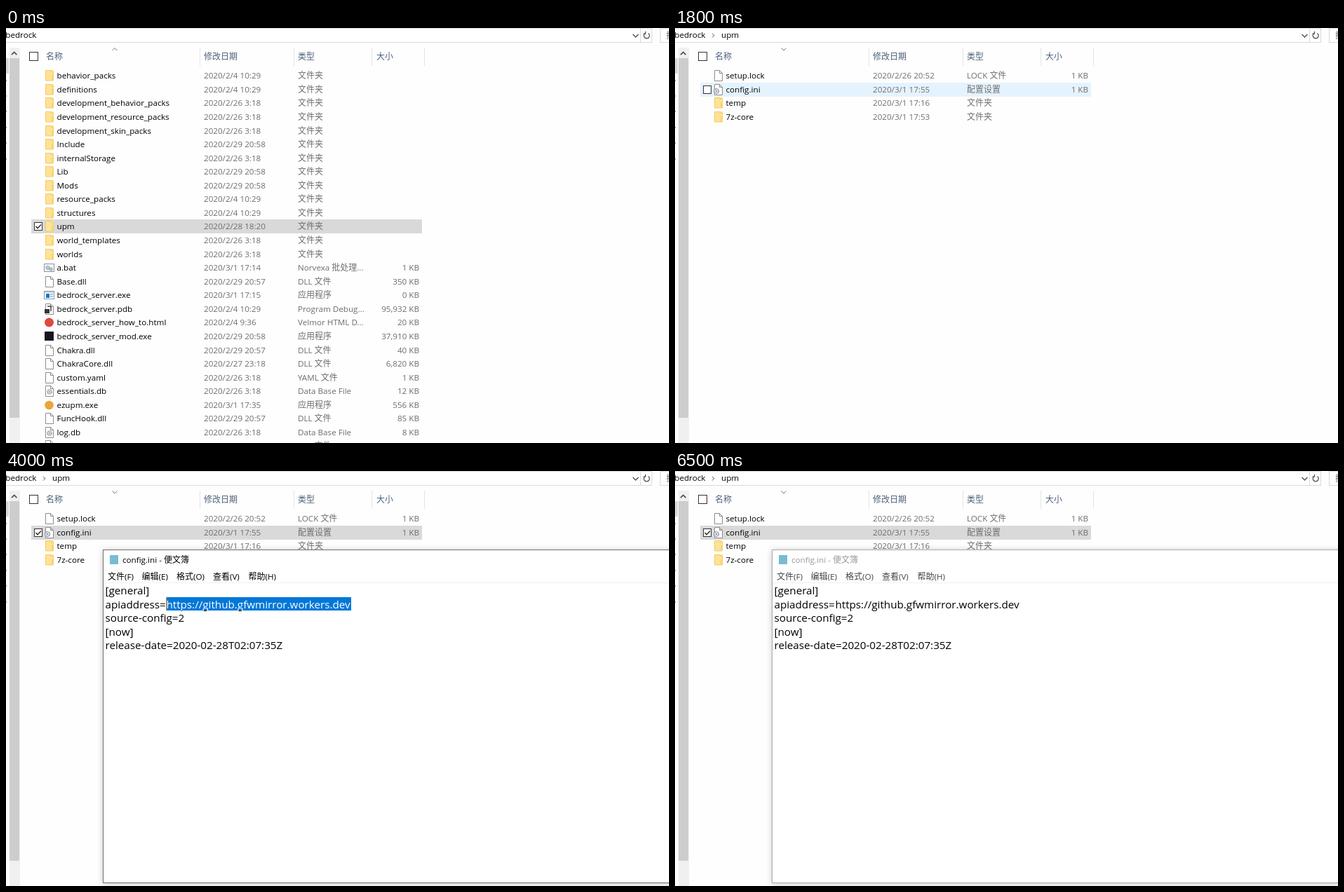
An HTML page for the animation above (6600 ms loop, 945 by 592 pixels).

```html
<!DOCTYPE html>
<html lang="zh">
<head>
<meta charset="utf-8">
<title>config.ini</title>
<style>
  html, body { margin: 0; width: 100%; height: 100%; overflow: hidden; background: #fefefe; }
  svg { display: block; }
  text { font-family: "Open Sans", "Noto Sans CJK SC", "Noto Sans CJK", sans-serif; white-space: pre; }
  .cjk { font-family: "Noto Sans CJK SC", "Noto Sans CJK", sans-serif; }
</style>
</head>
<body>
<svg id="stage" width="945" height="592" viewBox="0 0 945 592"></svg>
<script>
const LOOP = 6600, STEP = 100;
const GREY = '#6d6d6d', HEAD = '#4c607a';
const stage = document.getElementById('stage');

function el(parent, tag, attrs = {}) {
  const node = document.createElementNS('http://www.w3.org/2000/svg', tag);
  for (const k in attrs) node.setAttribute(k, attrs[k]);
  parent.appendChild(node);
  return node;
}
const group = (p, attrs) => el(p, 'g', attrs);
const rect = (p, x, y, width, height, fill, more) => el(p, 'rect', { x, y, width, height, fill, ...more });
const box = (p, x, y, w, h, fill, stroke) => rect(p, x + .5, y + .5, w - 1, h - 1, fill, { stroke });
const path = (p, d, stroke, width = 1, fill = 'none') => el(p, 'path', { d, stroke, 'stroke-width': width, fill });
const show = (node, on) => node.setAttribute('visibility', on ? 'visible' : 'hidden');

// Chinese runs are set slightly larger than Latin ones.
function label(p, x, y, str, fill = '#000', size = 11.65, anchor = 'start') {
  const node = el(p, 'text', { x, y, fill, 'font-size': size, 'text-anchor': anchor });
  str.split(/([\u3000-\u9fff]+)/).forEach((run, i) => {
    if (!run) return;
    el(node, 'tspan', i % 2 ? { class: 'cjk', 'font-size': size * 1.03 } : {}).textContent = run;
  });
  return node;
}

function gear(p, x, y, r) {
  el(p, 'circle', { cx: x, cy: y, r, fill: '#e8edf0', stroke: '#8b959c', 'stroke-width': 1.5, 'stroke-dasharray': '1.6 .6' });
  el(p, 'circle', { cx: x, cy: y, r: r * .35, fill: '#8b959c' });
}
const page = (p, y) => path(p, `M56.5 ${y - 7.5}h7l4 4v11h-11zM63.5 ${y - 7.5}v4h4`, '#8c8c8c', 1, '#fff');

const icons = {
  folder(p, y) {
    rect(p, 56, y - 8, 12, 15, '#ffe293');
    path(p, `M56.5 ${y - 7.5}h8v2h3v12.5h-11z`, '#f0cb69');
    rect(p, 65, y - 1, 3, 8, '#f7d374');
  },
  page,
  db(p, y) { page(p, y); gear(p, 62, y + 1, 3); },
  ini(p, y) { page(p, y); gear(p, 59, y + 2, 3.4); },
  bat(p, y) {
    box(p, 54, y - 6, 15, 12, '#f4f8fb', '#8a969e');
    gear(p, 59.5, y, 2.4);
    gear(p, 64, y + 2, 1.9);
  },
  exe(p, y) {
    box(p, 54, y - 6, 15, 12, '#fff', '#8a969e');
    rect(p, 55, y - 5, 13, 2, '#c9d6df');
    rect(p, 57, y - 2, 5, 6, '#1778c8');
    rect(p, 63, y - 2, 4, 2, '#9cc4e4');
    rect(p, 63, y + 1, 4, 2, '#9cc4e4');
  },
  pdb(p, y) {
    page(p, y);
    rect(p, 55, y, 7, 6, '#333');
    path(p, `M59 ${y - 4}h5v7`, '#444', 1.5);
  },
  red(p, y) { el(p, 'circle', { cx: 61.5, cy: y, r: 6.5, fill: '#dc4a3d' }); },
  dark(p, y) { rect(p, 55, y - 7, 13, 13, '#1a1320'); },
  gold(p, y) { el(p, 'circle', { cx: 61.5, cy: y, r: 6.3, fill: '#e5a93a' }); }
};

const rowY = i => Math.round(68.3 + 19.56 * i);
const types = { F: '文件夹', D: 'DLL 文件', A: '应用程序', B: 'Data Base File' };

function fileList(rows) {
  const g = group(stage);
  rows.trim().split('\n').forEach((line, i) => {
    const [name, date, type, size, icon] = line.trim().split('|');
    const y = rowY(i);
    icons[icon || (type === 'F' ? 'folder' : 'page')](g, y);
    label(g, 72.5, y + 4, name);
    label(g, 282, y + 4, '2020/' + date, GREY);
    label(g, 416, y + 4, types[type] || type, GREY);
    if (size) label(g, 589, y + 4, size + ' KB', GREY, 11.65, 'end');
  });
  return g;
}

// Address bar, navigation edge and scrollbar
box(stage, -5, 0, 926, 21, '#fff', '#d9d9d9');
path(stage, 'M904.5 1V20', '#d9d9d9');
box(stage, 932, 0, 40, 21, '#fff', '#d9d9d9');
path(stage, 'M893.5 9l4 4 4-4', '#555', 1.5);
path(stage, 'M915.5 7.6a4 4 0 1 1-4.6 0M911.5 4.8v3.4h-3', '#555', 1.3);
label(stage, 941, 15, '搜索', GREY);
label(stage, 43.3, 14, 'bedrock', '#000', 11.65, 'end');
const crumb = group(stage);
path(crumb, 'M53 8l2.8 2.8L53 13.6', '#555');
label(crumb, 66, 14, 'upm');
rect(stage, 0, 43, 4, 22, '#d9d9d9');
for (let i = 0; i < 6; i++) rect(stage, 0, Math.round(73.5 + 22.4 * i), 1, 2, '#999');
rect(stage, 5, 28, 15, 564, '#f0f0f0');
rect(stage, 5, 43, 14, 513, '#cdcdcd');
path(stage, 'M8 38.2l3.7-3.7 3.7 3.7', '#505050', 1.7);

// Column headings
const header = group(stage);
box(header, 33, 34, 13, 13, '#fff', '#333');
[[57, '名称'], [282, '修改日期'], [416, '类型'], [528, '大小']].forEach(([x, s]) => label(header, x, 45, s, HEAD));
[276, 410, 521, 596].forEach(x => rect(header, x, 28, 1, 26, '#e5e5e5'));
const arrowUp = path(header, 'M151.5 32l3.5-3.5 3.5 3.5', '#777');
const arrowDown = path(header, 'M151.5 28.5l3.5 3.5 3.5-3.5', '#777');

function highlight() {
  const g = group(stage);
  const bar = rect(g, 36.5, -9.5, 556, 19, '#fff');
  box(g, 40, -6, 12, 12, '#fff', '#333');
  const tick = path(g, 'M42.5 0l2.5 2.7 5-5.2', '#222', 1.3);
  return (row, fill, stroke, checked) => {
    show(g, row >= 0);
    show(tick, row >= 0 && checked);
    g.setAttribute('transform', `translate(0 ${rowY(Math.max(row, 0))})`);
    bar.setAttribute('fill', fill);
    bar.setAttribute('stroke', stroke);
  };
}
const hoverBar = highlight(), pickBar = highlight();

const server = fileList(`
  behavior_packs|2/4 10:29|F
  definitions|2/4 10:29|F
  development_behavior_packs|2/26 3:18|F
  development_resource_packs|2/26 3:18|F
  development_skin_packs|2/26 3:18|F
  Include|2/29 20:58|F
  internalStorage|2/26 3:18|F
  Lib|2/29 20:58|F
  Mods|2/29 20:58|F
  resource_packs|2/4 10:29|F
  structures|2/4 10:29|F
  upm|2/28 18:20|F
  world_templates|2/26 3:18|F
  worlds|2/26 3:18|F
  a.bat|3/1 17:14|Norvexa 批处理...|1|bat
  Base.dll|2/29 20:57|D|350
  bedrock_server.exe|3/1 17:15|A|0|exe
  bedrock_server.pdb|2/4 10:29|Program Debug...|95,932|pdb
  bedrock_server_how_to.html|2/4 9:36|Velmor HTML D...|20|red
  bedrock_server_mod.exe|2/29 20:58|A|37,910|dark
  Chakra.dll|2/29 20:57|D|40
  ChakraCore.dll|2/27 23:18|D|6,820
  custom.yaml|2/26 3:18|YAML 文件|1
  essentials.db|2/26 3:18|B|12|db
  ezupm.exe|3/1 17:35|A|556|gold
  FuncHook.dll|2/29 20:57|D|85
  log.db|2/26 3:18|B|8|db
  lualib.dll|2/29 20:57|D|52`);
const upm = fileList(`
  setup.lock|2/26 20:52|LOCK 文件|1
  config.ini|3/1 17:55|配置设置|1|ini
  temp|3/1 17:16|F
  7z-core|3/1 17:53|F`);

// Editor window
const editor = group(stage);
const frame = box(editor, 138, 112, 832, 476, '#fff', '#707070');
frame.style.filter = 'drop-shadow(0 1px 4px rgba(0,0,0,.22))';
rect(editor, 148, 120, 12, 13, '#79bcd2');
const titles = ['config.ini - 便文簿', '*config.ini - 便文簿'].map(s => label(editor, 166, 131, s));
const menuBtn = box(editor, 139, 141, 48, 19, '#cce8ff', '#99d1ff');
rect(editor, 139, 159, 830, 1, '#f0f0f0');
const bar = group(editor);
[[145, '文件(F)'], [193.5, '编辑(E)'], [243, '格式(O)'], [295, '查看(V)'], [345.5, '帮助(H)']]
  .forEach(([x, s]) => label(bar, x, 154.5, s, 'inherit'));

const URL_TEXT = 'https://github.gfwmirror.workers.dev';
const write = (p, x, line, s, fill) => label(p, x, 176 + 19.5 * line, s, fill, 15.2);
['[general]', 'apiaddress=', 'source-config=2', '[now]', 'release-date=2020-02-28T02:07:35Z']
  .forEach((s, i) => write(editor, 141.5, i, s));
write(editor, 228.5, 1, URL_TEXT);

const clip = el(el(stage, 'defs'), 'clipPath', { id: 'picked' });
const urlClip = rect(clip, 229, 180, 263, 19), lineClip = rect(clip, 142, 200, 118, 19);
const picked = group(editor, { 'clip-path': 'url(#picked)' });
rect(picked, 141, 180, 351, 40, '#0078d7');
write(picked, 228.5, 1, URL_TEXT, '#fff');
write(picked, 141.5, 2, 'source-config=2', '#fff');
const caret = rect(editor, 0, 0, 1, 19, '#000');

const popup = group(editor);
rect(popup, 143, 164, 219, 180, '#000', { opacity: .22 });
rect(popup, 142, 163, 219, 180, '#000', { opacity: .3 });
box(popup, 139, 160, 221, 182, '#f2f2f2', '#c4c4c4');
const items = [[172, '新建(N)', 'N'], [192, '新窗口(W)', 'Shift+N'], [213, '打开(O)...', 'O'], [233, '保存(S)', 'S'],
  [254, '另存为(A)...', 'Shift+S'], [281, '页面设置(U)...'], [301, '打印(P)...', 'P'], [328, '退出(X)']];
const itemBar = rect(popup, 141, 0, 216, 21, '#91c9f7');
for (const [y, s, key] of items) {
  label(popup, 171, y + 4, s);
  if (key) label(popup, 340, y + 4, 'Ctrl+' + key, '#000', 11.65, 'end');
}
[267, 315].forEach(y => rect(popup, 168, y, 188, 1, '#d0d0d0'));

function drawExplorer(k) {
  const first = k < 12, second = k >= 13;
  show(server, first);
  show(upm, second);
  show(crumb, second);
  show(header, first || second);
  show(arrowUp, first);
  show(arrowDown, second);

  const path1 = [-1, 15, 9, 10, 11, 12, 11];
  const path2 = { 16: 3, 17: 2, 18: 1, 19: 1 };
  const over = first ? path1[k] ?? 11 : path2[k] ?? -1;
  const pick = first ? 11 : k >= 20 ? 1 : -1;
  const active = first ? over === 11 : k < 25;
  hoverBar(over === pick ? -1 : over, '#e5f3ff', '#e5f3ff', false);
  pickBar(pick, active ? '#cce8ff' : '#d9d9d9', active ? '#99d1ff' : '#d9d9d9', true);
}

function drawSelection(k) {
  let from = 492, tail = 0;
  if (k === 31) tail = 118;
  else if (k === 32) tail = 60;
  else if (k >= 33 && k < 36) from = 491 - 30 * (Math.min(k, 34) - 32);
  else if (k >= 36 && k < 45) from = 229 + 43 * Math.max(0, 40 - k);
  urlClip.setAttribute('x', from);
  urlClip.setAttribute('width', 492 - from);
  lineClip.setAttribute('width', tail);
  show(picked, from < 492 || tail);
  return from;
}

function drawEditor(k) {
  const on = k >= 23, idle = k >= 65;
  editor.setAttribute('display', on ? 'inline' : 'none');
  if (!on) return;
  const scale = k === 23 ? .95 : k === 24 ? .988 : 1;
  editor.setAttribute('opacity', k === 23 ? .35 : k === 24 ? .8 : 1);
  editor.setAttribute('transform', `translate(552 350) scale(${scale}) translate(-552 -350)`);
  frame.setAttribute('stroke', idle ? '#aaa' : '#707070');
  bar.setAttribute('fill', idle ? '#444' : '#000');
  const edited = k >= 45 && k < 60;
  show(titles[0], !edited);
  show(titles[1], edited);
  titles[0].setAttribute('fill', idle ? '#999' : '#000');

  const from = drawSelection(k);
  const start = k < 28, drag = k >= 40 && k < 45;
  const blink = k === 30 || k >= 45 && k < 50 || k >= 55 && k < 60;
  show(caret, start || drag || blink);
  caret.setAttribute('x', start ? 142 : drag ? from - 1 : 491);
  caret.setAttribute('y', start ? 161 : 180);
  caret.setAttribute('fill', drag ? '#ff8728' : '#000');

  show(menuBtn, k >= 53 && k < 63);
  menuBtn.setAttribute('opacity', k === 53 || k >= 60 ? .5 : 1);
  popup.setAttribute('display', k >= 54 && k < 60 ? 'inline' : 'none');
  popup.setAttribute('opacity', k === 59 ? .5 : 1);
  const item = { 55: 0, 56: 2, 57: 3, 58: 3, 59: 3 }[k];
  show(itemBar, item !== undefined);
  itemBar.setAttribute('y', items[item ?? 0][0] - 10);
}

function draw(t) {
  const k = Math.floor(t / STEP);
  drawExplorer(k);
  drawEditor(k);
}

const began = performance.now();
function tick() {
  draw((performance.now() - began) % LOOP);
  requestAnimationFrame(tick);
}
tick();
</script>
</body>
</html>
```
